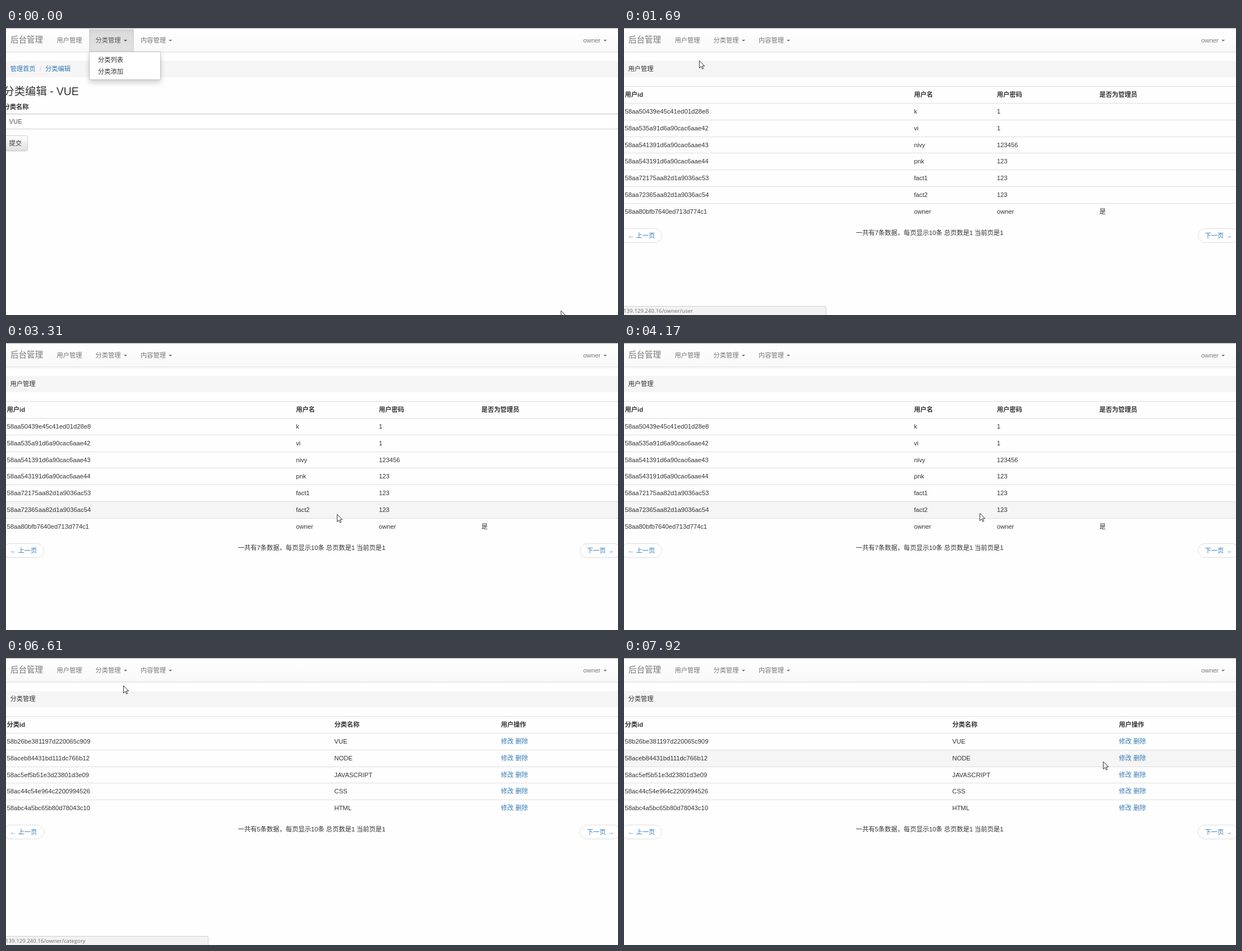
These frames come from a looping animation (1091 by 513 pixels, 8000 ms). An HTML page:

```html
<!DOCTYPE html>
<html lang="zh-CN">
<head>
<meta charset="utf-8">
<title>后台管理</title>
<style>
html, body { margin: 0; width: 100%; height: 100%; overflow: hidden; background: #fefefe; }
body { position: relative; color: #333; font: 11.27px/20px "Liberation Sans", "Noto Sans CJK SC", "Noto Sans CJK", sans-serif; }
div { position: absolute; box-sizing: border-box; white-space: pre; }
.page, .menu { left: 0; top: 0; }
.bar { background: linear-gradient(#fff, #f8f8f8); border-top: 1px solid #aaa; border-bottom: 1px solid #e7e7e7; box-shadow: 0 1px 4px rgba(0,0,0,.075); }
.nav { color: #777; }
.nav.on { color: #333; }
.nav.open { color: #555; }
.brand { font-size: 14.5px; color: #777; }
.caret { border: 3.2px solid transparent; border-top-color: currentColor; border-bottom: 0; }
.active { background: linear-gradient(#dbdbdb, #e2e2e2); box-shadow: inset 0 2px 7px rgba(0,0,0,.075); }
.drop { background: #fff; border: 1px solid rgba(0,0,0,.15); border-radius: 0 0 3px 3px; background-clip: padding-box; box-shadow: 0 5px 10px rgba(0,0,0,.175); }
.item.on { background: linear-gradient(#f5f5f5, #e8e8e8); color: #262626; }
.crumb { background: #f5f5f5; }
.link { color: #337ab7; }
.link.on { color: #23527c; text-decoration: underline; }
.slash { color: #ccc; }
.title { font-size: 19.32px; font-weight: 500; }
.bold { font-weight: bold; }
.input { background: #fff; border: 1px solid #ccc; box-shadow: inset 0 1px 1px rgba(0,0,0,.075); }
.value { color: #555; }
.button { background: linear-gradient(#fff, #e0e0e0); border: 1px solid #ccc; border-radius: 3.2px; box-shadow: 0 1px 1px rgba(0,0,0,.075); }
.row { border-top: 1px solid #ddd; }
.row.on { background: #f5f5f5; }
.pill { background: #fff; border: 1px solid #ddd; border-radius: 13px; color: #337ab7; }
.pill.on { background: #eee; color: #23527c; }
.status { background: #f2f2f2; border: 1px solid #d0d0d0; border-radius: 0 3px 0 0; }
.address { color: #707070; font: 9.66px/20px "Open Sans", "Noto Sans", sans-serif; }
svg { position: absolute; left: 0; top: 0; overflow: visible; }
svg path { fill: #fff; stroke: #000; stroke-linejoin: round; }
</style>
</head>
<body>
<script>
const LOOP = 8000;
const hits = [];

function add(parent, cls, x, y, w, h) {
  const el = document.createElement('div');
  el.className = cls;
  Object.assign(el.style, { left: x + 'px', top: y + 'px', width: w + 'px', height: h + 'px' });
  parent.append(el);
  return el;
}

// One line of text, centred on height cy
function text(parent, x, cy, str, cls = '') {
  const el = document.createElement('div');
  el.className = cls;
  el.style.left = x + 'px';
  el.style.top = cy - 10 + 'px';
  el.textContent = str;
  parent.append(el);
  return el;
}

function group(cls) {
  const el = document.createElement('div');
  el.className = cls;
  document.body.append(el);
  return el;
}

// Registers an area in which the pointer lights up an element
function hover(el, owner, x, y, w, h, hand = true) {
  hits.push({ el, owner, x, y, w, h, hand });
}

function link(page, x, cy, str, w) {
  hover(text(page, x, cy, str, 'link'), page, x, cy - 8, w, 16);
}

function pill(page, x, y, w, str, pad) {
  const el = add(page, 'pill', x, y, w, 26);
  text(el, pad, 12, str);
  hover(el, page, x, y, w, 26);
}

function listPage(title, cols, rows) {
  const page = group('page');
  add(page, 'crumb', 0, 59, 1091, 29);
  text(page, 7.5, 73, title);
  rows.forEach((cells, i) => {
    const y = Math.round(104 + 29.85 * i);
    hover(add(page, 'row', 0, y, 1091, 30), page, 0, y, 1091, 30, false);
    cells.forEach((cell, c) => text(page, cols[c], y + 15, cell, i ? '' : 'bold'));
  });
  const end = Math.round(104 + 29.85 * rows.length);
  pill(page, -6, end + 15, 74, '← 上一页', 12);
  text(page, 413.5, end + 23, `一共有${rows.length - 1}条数据，每页显示10条 总页数是1 当前页是1`);
  pill(page, 1023, end + 15, 74, '下一页 →', 11.5);
  return page;
}

const editPage = group('page');
add(editPage, 'crumb', 0, 59, 1091, 29);
link(editPage, 7.5, 73, '管理首页', 45);
text(editPage, 60, 73, '/', 'slash');
link(editPage, 70, 73, '分类编辑', 45);
text(editPage, -4.5, 114, '分类编辑 - VUE', 'title');
text(editPage, -4.5, 141, '分类名称', 'bold');
add(editPage, 'input', -5, 153, 1101, 28);
text(editPage, 5.5, 167, 'VUE', 'value');
add(editPage, 'button', -5, 192, 44, 28);
text(editPage, 5.5, 206, '提交');

const userPage = listPage('用户管理', [1.5, 516.9, 664.7, 847.5], [
  ['用户id', '用户名', '用户密码', '是否为管理员'],
  ['58aa50439e45c41ed01d28e8', 'k', '1'],
  ['58aa535a91d6a90cac6aae42', 'vi', '1'],
  ['58aa541391d6a90cac6aae43', 'nivy', '123456'],
  ['58aa543191d6a90cac6aae44', 'pnk', '123'],
  ['58aa72175aa82d1a9036ac53', 'fact1', '123'],
  ['58aa72365aa82d1a9036ac54', 'fact2', '123'],
  ['58aa80bfb7640ed713d774c1', 'owner', 'owner', '是'],
]);

const categoryPage = listPage('分类管理', [1.5, 585.3, 882.2], [
  ['分类id', '分类名称', '用户操作'],
  ['58b26be381197d220065c909', 'VUE'],
  ['58aceb84431bd111dc766b12', 'NODE'],
  ['58ac5ef5b51e3d23801d3e09', 'JAVASCRIPT'],
  ['58ac44c54e964c2200994526', 'CSS'],
  ['58abc4a5bc65b80d78043c10', 'HTML'],
]);
for (const cy of [149, 179, 209, 238, 268]) {
  link(categoryPage, 882.2, cy, '修改', 23);
  link(categoryPage, 907.9, cy, '删除', 23);
}

const navbar = group('menu');
add(navbar, 'bar', 0, 0, 1091, 43);
const menu = group('menu');
add(menu, 'active', 148, 2, 80, 40);
add(menu, 'drop', 148, 42, 128, 51);
[['分类列表', 57], ['分类添加', 78]].forEach(([str, cy]) => {
  const el = add(menu, 'item', 149, cy - 10, 126, 20);
  text(el, 15, 10, str);
  hover(el, menu, 149, cy - 10, 126, 20);
});

const labels = group('menu');
text(labels, 8, 21, '后台管理', 'brand');
function navItem(x, str, caretX, left, width) {
  const el = text(labels, x, 21.5, str, 'nav');
  if (caretX) add(el, 'caret', caretX - x, 9.5, 6.4, 3.2);
  hover(el, labels, left, 1, width, 41);
  return el;
}
navItem(90.5, '用户管理', 0, 79, 69);
const toggle = navItem(159.5, '分类管理', 209.8, 148, 80);
navItem(240, '内容管理', 290, 228, 80);
navItem(1029, 'owner', 1064.5, 1017, 74);

const status = group('menu');
add(status, 'status', -2, 497, 363, 20);
const address = text(status, -1, 506, '', 'address');

document.body.insertAdjacentHTML('beforeend', `<svg width="1" height="1">
  <path id="arrow" transform="scale(.8)" d="M.5.5V17L4.3 13.3L7 19L9.3 18L6.8 12.3H12Z"/>
  <path id="hand" transform="translate(-5.2) scale(.8)" d="M5 1.7Q6.5 0 8 1.7V7.5Q9.8 6.3 11 8Q12.7 7 13.7 8.7Q15.7 8 16 10V15.5L14 18.5V22H5.5V19L1 13Q1 10.8 3 11.5L5 13.5ZM8 7.5V11M11 8V11.5M13.7 8.7V12"/>
</svg>`);
const pointer = document.querySelector('svg');
const [arrow, hand] = pointer.children;

// Bursts of movement: start, end, number of steps
const bursts = [
  [70, 460, 6], [610, 840, 4], [1020, 1780, 11], [1860, 2640, 11], [2720, 3410, 10],
  [3540, 4320, 11], [4420, 5200, 11], [5450, 6220, 10], [6370, 7140, 11], [7220, 7920, 10],
];

// Pointer path: time, x, y
const path = [
  [0, 989, 505], [385, 150, 112], [460, 98, 55], [540, 98, 55], [840, 121, 41], [1500, 121, 41],
  [1780, 150, 79], [2406, 690, 168], [2640, 655, 296], [2700, 655, 296], [3000, 640, 235],
  [3410, 560, 349], [3540, 560, 349], [3850, 45, 366], [4164, 634, 304], [4320, 632, 286],
  [4900, 115, 25], [5200, 215, 22], [5450, 215, 22], [5900, 209, 52], [6220, 209, 49],
  [6700, 209, 49], [7140, 330, 118], [7600, 560, 278], [7920, 854, 185],
];

function stepped(t) {
  const burst = bursts.findLast(b => b[0] <= t);
  if (!burst) return 0;
  const [start, end, n] = burst;
  const step = (end - start) / (n - 1);
  return start + Math.min(n - 1, Math.floor((t - start) / step + 1e-6)) * step;
}

function pointerAt(t) {
  const i = path.findIndex(p => p[0] > t);
  if (i < 0) return path.at(-1).slice(1);
  const [t0, x0, y0] = path[i - 1], [t1, x1, y1] = path[i];
  const k = (t - t0) / (t1 - t0);
  return [x0 + (x1 - x0) * k, y0 + (y1 - y0) * k].map(Math.round);
}

function render(time) {
  const t = stepped(time);
  const [x, y] = pointerAt(t);
  const open = t < 1019 || (t >= 5449 && t < 6440);

  editPage.hidden = t >= 1395;
  userPage.hidden = t < 1395 || t >= 6440;
  categoryPage.hidden = t < 6440;
  menu.hidden = !open;
  toggle.classList.toggle('open', open);
  status.hidden = !((t >= 1019 && t < 1640) || (t >= 4880 && t < 6900));
  address.textContent = '139.129.240.16/owner/' + (t < 5800 ? 'user' : 'category');

  let overLink = false;
  for (const h of hits) {
    const on = !h.owner.hidden && x >= h.x && x < h.x + h.w && y >= h.y && y < h.y + h.h;
    h.el.classList.toggle('on', on);
    overLink ||= on && h.hand;
  }
  arrow.style.display = overLink ? 'none' : '';
  hand.style.display = overLink ? '' : 'none';
  pointer.style.transform = `translate(${x}px, ${y}px)`;
}

const start = performance.now();
function frame() {
  render((performance.now() - start) % LOOP);
  requestAnimationFrame(frame);
}
frame();
</script>
</body>
</html>
```
